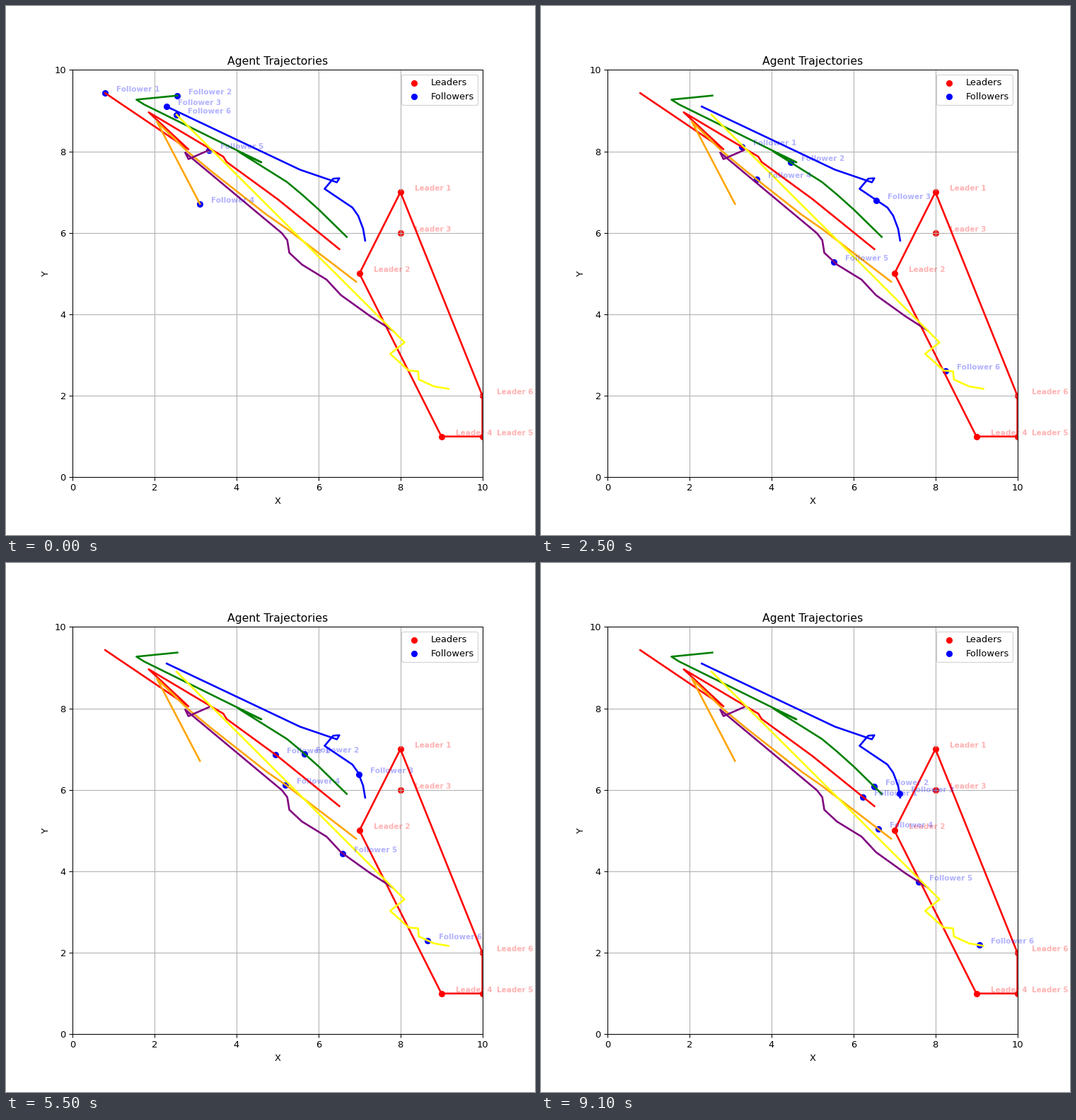
These frames come from a looping animation (748 by 748 pixels, 9200 ms). A matplotlib script:

```python
import numpy as np
import matplotlib.pyplot as plt
from matplotlib.animation import FuncAnimation

FRAMES = 92
INTERVAL = 100
TURN_FRAME = 16    # the overshoot legs end here and the glide begins
END_FRAME = 100    # the loop restarts just before the glides finish
LABEL_OFFSET = 0.8

plt.rcParams["font.family"] = "DejaVu Sans"

leaders = np.array([(8, 7), (7, 5), (8, 6), (9, 1), (10, 1), (10, 2)])
hull_order = [0, 1, 3, 4, 5, 0]

# colour, glide exponent, corners of the overshoot legs, corners of the glide
followers = [
    ("red", 0.56,
     [(0.80, 9.43), (2.83, 8.05), (1.86, 8.96)],
     [(3.68, 7.87), (3.76, 7.74), (5.00, 6.83), (6.51, 5.60)]),
    ("green", 0.57,
     [(2.56, 9.37), (1.56, 9.27), (1.75, 9.15), (4.61, 7.73)],
     [(4.04, 8.00), (5.23, 7.25), (5.60, 6.94), (6.01, 6.57), (6.69, 5.90)]),
    ("blue", 0.55,
     [(2.30, 9.10), (5.55, 7.55), (6.45, 7.24), (6.51, 7.34), (6.36, 7.33),
      (6.15, 7.08)],
     [(6.83, 6.62), (6.97, 6.42), (7.09, 6.10), (7.14, 5.81)]),
    ("orange", 0.70,
     [(3.11, 6.71), (2.06, 8.73), (2.80, 8.00)],
     [(3.39, 7.51), (4.73, 6.45), (5.23, 6.10), (6.92, 4.80)]),
    ("purple", 0.66,
     [(3.33, 8.03), (2.83, 7.81), (2.75, 7.97), (5.11, 5.99)],
     [(5.24, 5.82), (5.29, 5.51), (5.60, 5.22), (6.20, 4.85), (6.55, 4.47),
      (7.27, 3.95), (7.81, 3.60)]),
    ("yellow", 0.45,
     [(2.54, 8.90), (8.10, 3.31), (7.75, 3.03)],
     [(8.20, 2.62), (8.43, 2.60), (8.45, 2.40), (8.82, 2.23), (9.17, 2.17)]),
]


def along(points, position, progress):
    """Points on a polyline whose vertices sit at the given positions."""
    return np.column_stack([np.interp(progress, position, axis)
                            for axis in np.array(points).T])


def trace(legs, glide, exponent):
    """Equal time per overshoot leg, then a decelerating glide by arc length."""
    frame = np.arange(FRAMES)
    lead = along(legs, np.linspace(0, TURN_FRAME, len(legs)), frame)

    glide = np.array(legs[-1:] + glide)
    steps = np.hypot(*np.diff(glide, axis=0).T)
    length = np.concatenate([[0], np.cumsum(steps)])
    u = np.clip((frame - TURN_FRAME) / (END_FRAME - TURN_FRAME), 0, 1)
    tail = along(glide, length, length[-1] * u ** exponent)
    return np.where(frame[:, None] < TURN_FRAME, lead, tail)


def add_label(name, point, color):
    return ax.text(point[0] + LABEL_OFFSET, point[1], name, color=color,
                   fontsize=8, fontweight="bold", alpha=0.3,
                   ha="center", va="bottom")


motion = np.array([trace(legs, glide, exponent)
                   for _, exponent, legs, glide in followers])

fig, ax = plt.subplots(figsize=(8, 8), dpi=93.5)
fig.subplots_adjust(left=0.1256, right=0.9006, bottom=0.1092, top=0.8792)
ax.set(xlim=(0, 10), ylim=(0, 10), xlabel="X", ylabel="Y",
       title="Agent Trajectories")
ax.grid(True)

ax.scatter(*leaders.T, color="red", label="Leaders")
dots = ax.scatter(*motion[:, 0].T, color="blue", label="Followers")
ax.plot(*leaders[hull_order].T, color="red", lw=2)
for color, _, legs, glide in followers:
    ax.plot(*np.array(legs + glide).T, color=color, lw=2)

for i, point in enumerate(leaders, 1):
    add_label(f"Leader {i}", point, "red")
labels = [add_label(f"Follower {i}", point, "blue")
          for i, point in enumerate(motion[:, 0], 1)]
ax.legend(loc="upper right")


def update(frame):
    points = motion[:, frame]
    dots.set_offsets(points)
    for label, (x, y) in zip(labels, points):
        label.set_position((x + LABEL_OFFSET, y))
    return [dots, *labels]


anim = FuncAnimation(fig, update, frames=FRAMES, interval=INTERVAL,
                     repeat=True, repeat_delay=0)
plt.show()
```
